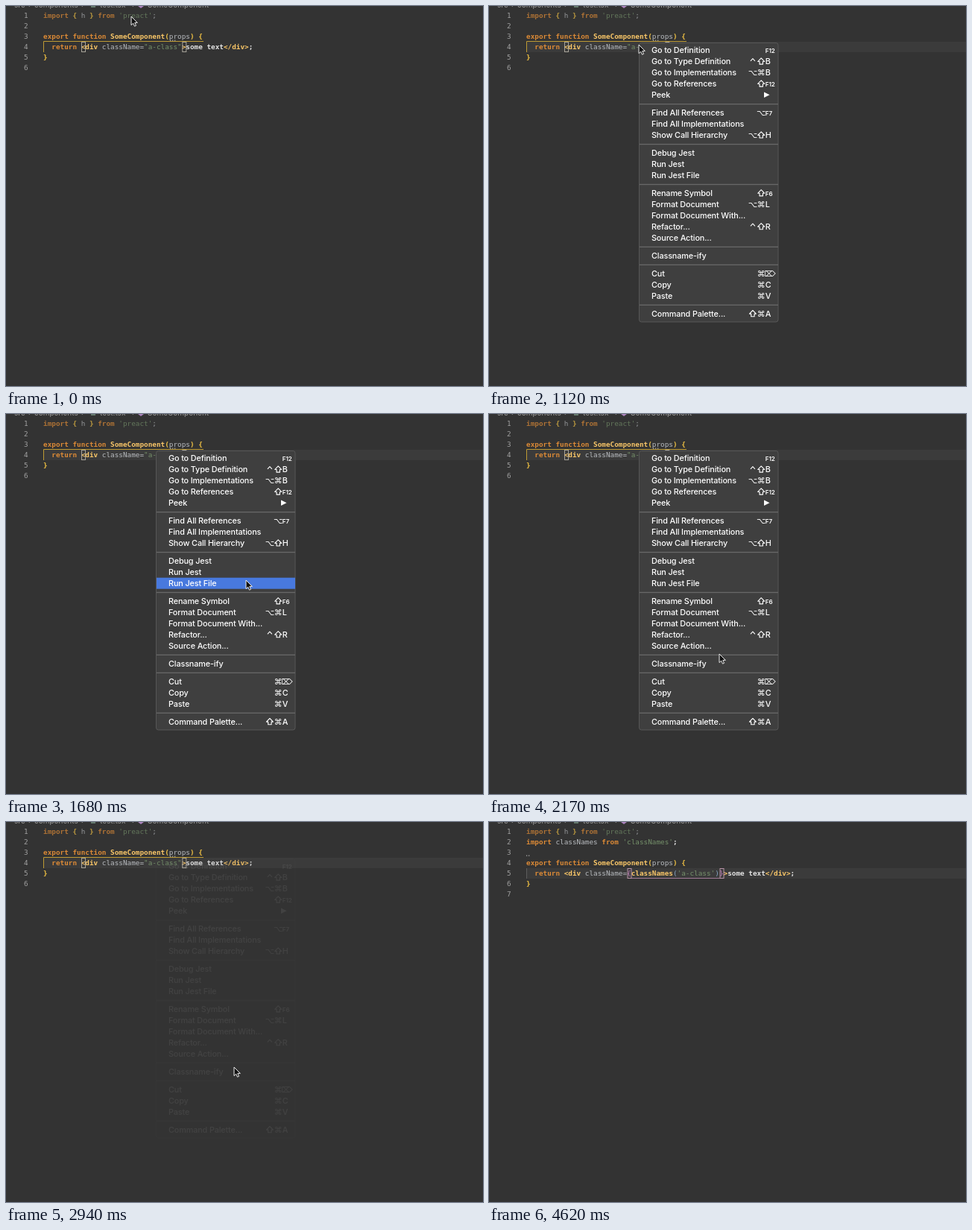
An HTML page that plays this animation: 640x510 px, repeating every 4.69 s.

```html
<!DOCTYPE html>
<html lang="en">
<head>
<meta charset="utf-8">
<title>Context menu refactor</title>
<style>
  html, body { margin: 0; width: 100%; height: 100%; overflow: hidden; background: #333; }
  svg { display: block; width: 640px; height: 510px; }
  text { white-space: pre; }
  .code { font: 9.35px "DejaVu Sans Mono", monospace; }
  .crumb { font: 10px Inter, sans-serif; fill: #a0a0a0; }
  .item { font: 500 10.8px Inter, sans-serif; letter-spacing: -.11px; fill: #fff; }
  .key { font: 500 10.8px Inter, sans-serif; fill: #fff; }
  .fkey { font: 600 8px Inter, sans-serif; letter-spacing: -.1px; fill: #fff; }
  .sym { font: 10.8px "DejaVu Sans", sans-serif; fill: #fff; text-anchor: middle; }
  .glyph { fill: none; stroke: #fff; stroke-width: 1.1; stroke-linejoin: round; }
  .num { fill: #a0a0a0; text-anchor: end; }
  .k { fill: #dc8a36; font-weight: bold; }
  .f, .t { fill: #fac768; font-weight: bold; }
  .g { fill: #efc043; font-weight: bold; }
  .o { fill: #c57fc0; }
  .b { fill: #83a4c4; }
  .p { fill: #b9bcc0; }
  .s { fill: #75906a; }
  .w { fill: #e4e4e4; font-weight: bold; }
  .dim { opacity: .72; }
  .box { fill: none; }
</style>
</head>
<body>
<svg id="stage" viewBox="0 0 640 510"></svg>
<script>
const LOOP = 4690, STEP = 70, ROW = 14;
const FOCUS = 630, MENU_OPEN = 770, FADE = 2730, MENU_GONE = 3010, EDITED = 3080;
const stage = document.getElementById('stage');

function add(parent, tag, attrs = {}, content = '') {
  const el = document.createElementNS('http://www.w3.org/2000/svg', tag);
  for (const name in attrs) el.setAttribute(name, attrs[name]);
  if (content) el.textContent = content;
  return parent.appendChild(el);
}
const rect = (parent, x, y, width, height, fill) =>
  add(parent, 'rect', { x, y, width, height, fill });
const label = (parent, cls, x, y, str) => add(parent, 'text', { class: cls, x, y }, str);
const show = (el, on) => el.setAttribute('visibility', on ? 'visible' : 'hidden');

// Each token is a one-letter class followed by its text.
const importLine = ['kimport ', 'g{ ', 'ph', 'g } ', 'kfrom ', "s'preact'", 'p;'];
const headLine = ['kexport function ', 'fSomeComponent', 'g(', 'pprops', 'g) {'];
const tailLine = ['wsome text', 't</div>', 'w;'];

function codeRow(parent, row, tokens) {
  const y = 2 + ROW * row;
  label(parent, 'code num', 29.7, y, String(row));
  const line = add(parent, 'text', { class: 'code' + (row === 1 ? ' dim' : ''), x: 50, y });
  for (const tok of tokens) add(line, 'tspan', { class: tok[0] }, tok.slice(1));
}
function bracketBox(parent, x, y, stroke) {
  add(parent, 'rect', { class: 'box', x, y, width: 5, height: 13, stroke });
}
function dots(parent, x, y, n) {
  for (let i = 0; i < n; i++) rect(parent, x + i * 3, y, 1.3, 1.3, '#aaa');
}
function codeBlock(rows) {
  const g = add(stage, 'g');
  rows.forEach((tokens, i) => codeRow(g, i + 1, tokens));
  return g;
}

const band = rect(stage, 50, 48, 590, ROW, '#3b3b3b');

const crumbs = add(stage, 'g');
[[11, 'src'], [30, '›'], [38, 'components'], [101, '›'], [126, 'test.tsx'], [169, '›'], [190, 'SomeComponent']]
  .forEach(([x, str]) => label(crumbs, 'crumb', x, 2, str));
rect(crumbs, 114, -4, 6, 6, '#64796d');
add(crumbs, 'path', { d: 'M177-4L181-6L185-4V0L181 3L177 0Z', fill: '#ab83bd' });

const before = codeBlock([
  importLine, [], headLine,
  ['k  return ', 't<div ', 'pclassName=', 's"a-class"', 't>', ...tailLine],
  ['g}'], []
]);
add(before, 'path', { d: 'M265 47.5H50.5V62', fill: 'none', stroke: '#bd9a34' });
bracketBox(before, 101.5, 48.5, '#a8a49a');
bracketBox(before, 236.8, 48.5, '#a8a49a');
dots(before, 220, 45.5, 3);

const after = codeBlock([
  importLine,
  ['kimport ', 'pclassNames ', 'kfrom ', "s'classNames'", 'w;'],
  [], headLine,
  ['k  return ', 't<div ', 'pclassName=', 'o{', 'fclassNames', 'b(', "s'a-class'", 'b)', 'o}', 't>', ...tailLine],
  ['g}'], []
]);
rect(after, 50, 62, 1, ROW, '#5c5c5c');
rect(after, 189, 75, 124, 1, '#a07a96');
bracketBox(after, 186, 62.5, '#b893a8');
bracketBox(after, 310, 62.5, '#b893a8');
dots(after, 50, 44.5, 2);

// Items as [label, shortcut]; a separator stands between groups.
const groups = [
  [['Go to Definition', 'F12'], ['Go to Type Definition', '^⇧B'], ['Go to Implementations', '⌥⌘B'],
    ['Go to References', '⇧F12'], ['Peek', '>']],
  [['Find All References', '⌥F7'], ['Find All Implementations'], ['Show Call Hierarchy', '⌥⇧H']],
  [['Debug Jest'], ['Run Jest'], ['Run Jest File']],
  [['Rename Symbol', '⇧F6'], ['Format Document', '⌥⌘L'], ['Format Document With...'],
    ['Refactor...', '^⇧R'], ['Source Action...']],
  [['Classname-ify']],
  [['Cut', '⌘⌦'], ['Copy', '⌘C'], ['Paste', '⌘V']],
  [['Command Palette...', '⇧⌘A']]
];

// Modifier outlines drawn around their centre.
const outlines = {
  '⇧': 'M0-4.4L4.5.2H2.2V3.8H-2.2V.2H-4.5Z',
  '^': 'M-3-.6L0-3.8L3-.6'
};

function modifier(parent, key, x, y) {
  if (outlines[key]) {
    add(parent, 'path', { class: 'glyph', d: outlines[key], transform: `translate(${x} ${y})` });
  } else {
    label(parent, 'sym', x, y + 4, key);
  }
}

function shortcut(parent, keys, y) {
  if (keys === '>') {
    add(parent, 'path', { d: `M369 ${y - 3.8}L376.5 ${y}L369 ${y + 3.8}Z`, fill: '#fff' });
    return;
  }
  const fn = keys.match(/F\d+$/);
  const last = fn ? fn[0] : keys.slice(-1);
  const mods = [...keys.slice(0, -last.length)].reverse();
  mods.forEach((key, i) => modifier(parent, key, 365.2 - i * 11.3, y));
  if (last === '⌦') modifier(parent, last, 377, y);
  else label(parent, fn ? 'fkey' : 'key', 370.8, y + (fn ? 3.6 : 4), last);
}

const menu = add(stage, 'g');
add(menu, 'rect', { x: 201.5, y: 49.5, width: 186.5, height: 374.5, rx: 3, fill: '#3f3f3f', stroke: '#575757' });
const hover = rect(menu, 202, 0, 186, 15, '#4879de');
const centers = [];
let rowY = 59.4;
groups.forEach((items, i) => {
  if (i) {
    rect(menu, 202, rowY - 3.2, 186, 1.3, '#686868');
    rowY += 9.05;
  }
  for (const [name, keys] of items) {
    label(menu, 'item', 218, rowY + 3.9, name);
    if (keys) shortcut(menu, keys, rowY);
    centers.push(rowY);
    rowY += 14.96;
  }
});

const pointer = add(stage, 'path', {
  d: 'M0 0V11.6L2.7 9.2L4.5 13.2L6.5 12.3L4.8 8.4H8.3Z',
  fill: '#111', stroke: '#eee', 'stroke-width': 1, 'stroke-linejoin': 'round'
});

// Pointer tip: time, x, y
const path = [
  [0, 168, 14], [70, 168, 14], [350, 186, 35], [630, 201, 52], [1330, 201, 52],
  [1470, 246, 106], [1680, 322, 223], [1820, 318, 278], [2170, 309, 322],
  [2310, 306, 329], [3010, 306, 329], [3500, 308, 345], [3570, 328, 405],
  [3640, 361, 481], [3710, 384, 505], [3780, 392, 530], [LOOP, 392, 530]
];

function tipAt(t) {
  const i = path.findIndex(p => p[0] > t);
  const [t0, x0, y0] = path[i - 1], [t1, x1, y1] = path[i];
  const u = (t - t0) / (t1 - t0);
  return [x0 + (x1 - x0) * u, y0 + (y1 - y0) * u];
}

function draw(now) {
  const t = Math.floor((now % LOOP) / STEP) * STEP;
  const [x, y] = tipAt(t);
  const edited = t >= EDITED;
  const open = t >= MENU_OPEN && t < MENU_GONE;

  pointer.setAttribute('transform', `translate(${x} ${y})`);
  show(before, !edited);
  show(after, edited);
  show(band, t >= FOCUS);
  band.setAttribute('y', edited ? 62 : 48);

  show(menu, open);
  menu.setAttribute('opacity', t < FADE ? 1 : Math.max(.07, 1 - (t - FADE) / 220));
  const row = centers.find(c => Math.abs(c - y) <= 7.4);
  const blink = t === 2590;
  show(hover, open && x > 202 && row !== undefined && !blink && t < 2870);
  if (row !== undefined) hover.setAttribute('y', row - 7.4);
}

function frame() {
  draw(performance.now());
  requestAnimationFrame(frame);
}
frame();
</script>
</body>
</html>
```
